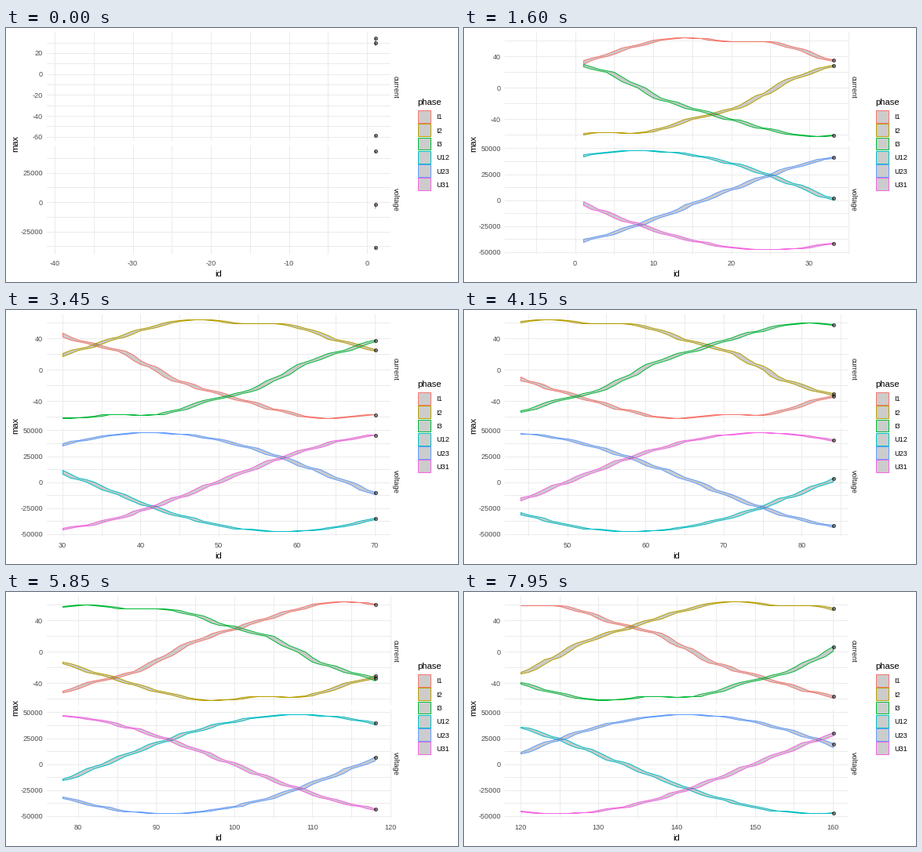
A matplotlib script for the animation above (8000 ms loop, 576 by 324 pixels).

```python
import math
import numpy as np
import matplotlib as mpl
import matplotlib.pyplot as plt
from matplotlib.animation import FuncAnimation
from matplotlib.collections import LineCollection
from matplotlib.patches import Polygon, Rectangle

W, H, DPI = 576, 324, 72
COUNT, STEP_MS, WINDOW = 160, 50, 40
LEFT, RIGHT = 52.0, 490.0
PANELS = {"current": (5.5, 144.3), "voltage": (149.8, 288.6)}
FILL = (0.2, 0.2, 0.2, 0.25)
SMALL, LARGE = 9.1, 11.3

mpl.rcParams["font.family"] = "Liberation Sans"


# ---- signals: each id holds the low and high value of a short time slice ----

def warp(t):
    """Ripple in time, 24 times per mains period."""
    return t + 0.28 * np.sin(2 * np.pi * 24 * (t - 1.4) / 100)


def current_wave(t):
    harmonics = {1: (29.4, 56.3), 2: (-0.3, 0.95), 3: (1.8, 0.5),
                 5: (-0.7, -1.0), 7: (0.0, -2.0), 9: (-0.7, 0.9)}
    a = 2 * np.pi * t / 100
    return sum(c * np.cos(m * a) + s * np.sin(m * a)
               for m, (c, s) in harmonics.items())


def voltage_wave(t):
    return 47700 * np.cos(2 * np.pi * t / 100)


# name: panel, colour, wave, delay, gain, offset
PHASES = {
    "I1": ("current", "#F8766D", current_wave, 0.2, 1.0, 0.4),
    "I2": ("current", "#B79F00", current_wave, 33.5, 1.0, 0.4),
    "I3": ("current", "#00BA38", current_wave, 66.9, 0.965, -1.6),
    "U12": ("voltage", "#00BFC4", voltage_wave, 8.4, 1.0, 300),
    "U23": ("voltage", "#619CFF", voltage_wave, 41.5, 1.0, 300),
    "U31": ("voltage", "#F564E3", voltage_wave, 75.0, 1.0, 300),
}

ids = np.arange(1, COUNT + 1)
slices = warp(ids[:, None] + np.linspace(-0.3, 0.7, 9))
bands = {}
for name, (_, _, wave, delay, gain, offset) in PHASES.items():
    values = gain * wave(slices - delay) + offset
    bands[name] = values.min(axis=1), values.max(axis=1)


# ---- axis breaks, chosen by simplicity, coverage and density ----

def break_step(lo, hi, target=5):
    span = hi - lo
    best, chosen = -9, None
    base = math.floor(math.log10(span))
    for i, q in enumerate((1, 5, 2, 2.5, 4, 3)):
        for z in (base - 1, base):
            step = q * 10.0 ** z
            if not 1.5 < span / step < 12:
                continue
            first = math.floor(lo / step) - 1
            for a in range(first, first + 4):
                for k in range(2, 11):
                    start, end = a * step, (a + k - 1) * step
                    zero = start <= 0 <= end
                    simple = -i / 5 + zero
                    cover = 1 - 0.5 * ((hi - end) ** 2 + (lo - start) ** 2) / (0.1 * span) ** 2
                    r = (k - 1) / (end - start)
                    rt = (target - 1) / (max(end, hi) - min(start, lo))
                    dense = 2 - max(r / rt, rt / r)
                    score = 0.25 * simple + 0.2 * cover + 0.5 * dense
                    if score > best + 1e-9:
                        best, chosen = score, step
    return chosen


def breaks(lo, hi):
    """Major breaks, and all grid positions including the halves."""
    half = break_step(lo, hi) / 2
    n = range(math.ceil(lo / half), math.floor(hi / half) + 1)
    return [k * half for k in n if k % 2 == 0], [k * half for k in n]


def expand(lo, hi):
    pad = 0.05 * (hi - lo)
    return lo - pad, hi + pad


# ---- stage, in pixel units ----

fig = plt.figure(figsize=(W / DPI, H / DPI), dpi=DPI, facecolor="white")
ax = fig.add_axes([0, 0, 1, 1])
ax.set_xlim(0, W)
ax.set_ylim(H, 0)
ax.axis("off")


def label(x, y, s, size=SMALL, color="black", ha="left", rotation=0):
    return ax.text(x, y, s, fontsize=size, color=color, ha=ha, va="baseline",
                   rotation=rotation, rotation_mode="anchor")


def pixel(v):
    """Centre of the nearest whole pixel."""
    return np.floor(np.asarray(v) + 0.5) + 0.5


def draw_fixed():
    label(271, 317, "id", LARGE, ha="center")
    label(15.5, 147, "max", LARGE, ha="center", rotation=90)
    for name, (top, bottom) in PANELS.items():
        label(493.5, (top + bottom) / 2, name, color="#1A1A1A",
              ha="center", rotation=270)
    label(524.5, 98, "phase", LARGE)
    cell, inset = 17.28, 0.7
    side = cell - 2 * inset
    for i, (name, (_, color, *_)) in enumerate(PHASES.items()):
        y = 104.3 + i * cell
        ax.add_patch(Rectangle((524.7 + inset, y + inset), side, side,
                               fc="#CCCCCC", ec=color, lw=1))
        label(548, y + cell / 2 + 3.5, name)


draw_fixed()
live = []


def draw(frame):
    while live:
        live.pop().remove()
    now = frame + 1
    view = slice(max(now - WINDOW, 1) - 1, now)
    x_lo, x_hi = expand(now - WINDOW, now)

    def to_x(v):
        return LEFT + (v - x_lo) / (x_hi - x_lo) * (RIGHT - LEFT)

    x_major, x_grid = breaks(x_lo, x_hi)
    for v in x_major:
        live.append(label(to_x(v), 302.7, f"{v:.0f}", color="#4D4D4D", ha="center"))

    grid, dots = [], []
    for panel, (top, bottom) in PANELS.items():
        names = [n for n in PHASES if PHASES[n][0] == panel]
        # the value range covers everything seen so far
        y_lo, y_hi = expand(min(bands[n][0][:now].min() for n in names),
                            max(bands[n][1][:now].max() for n in names))

        def to_y(v):
            return bottom - (v - y_lo) / (y_hi - y_lo) * (bottom - top)

        y_major, y_grid = breaks(y_lo, y_hi)
        grid += [[(LEFT, pixel(to_y(v))), (RIGHT, pixel(to_y(v)))] for v in y_grid]
        grid += [[(pixel(to_x(v)), top), (pixel(to_x(v)), bottom)] for v in x_grid]
        for v in y_major:
            live.append(label(47.2, to_y(v) + 3.6, f"{v:.0f}", color="#4D4D4D", ha="right"))

        px = pixel(to_x(ids[view]))
        for n in names:
            low, high = (pixel(to_y(b[view])) for b in bands[n])
            outline = np.column_stack([np.r_[px, px[::-1]], np.r_[high, low[::-1]]])
            live.append(ax.add_patch(Polygon(
                outline, closed=True, fc=FILL, ec=PHASES[n][1], lw=1,
                joinstyle="round", snap=False, zorder=2)))
            dots.append((px[-1], high[-1]))

    live.append(ax.add_collection(LineCollection(
        grid, colors="#EBEBEB", linewidths=1, snap=False, zorder=1),
        autolim=False))
    live.append(ax.scatter(*zip(*dots), s=17.6, facecolors=(0, 0, 0, 0.5),
                           edgecolors=(0, 0, 0, 0.6), linewidths=0.9, zorder=3))
    return live


anim = FuncAnimation(fig, draw, frames=COUNT, interval=STEP_MS,
                     repeat=True, repeat_delay=0, blit=False)
plt.show()
```
